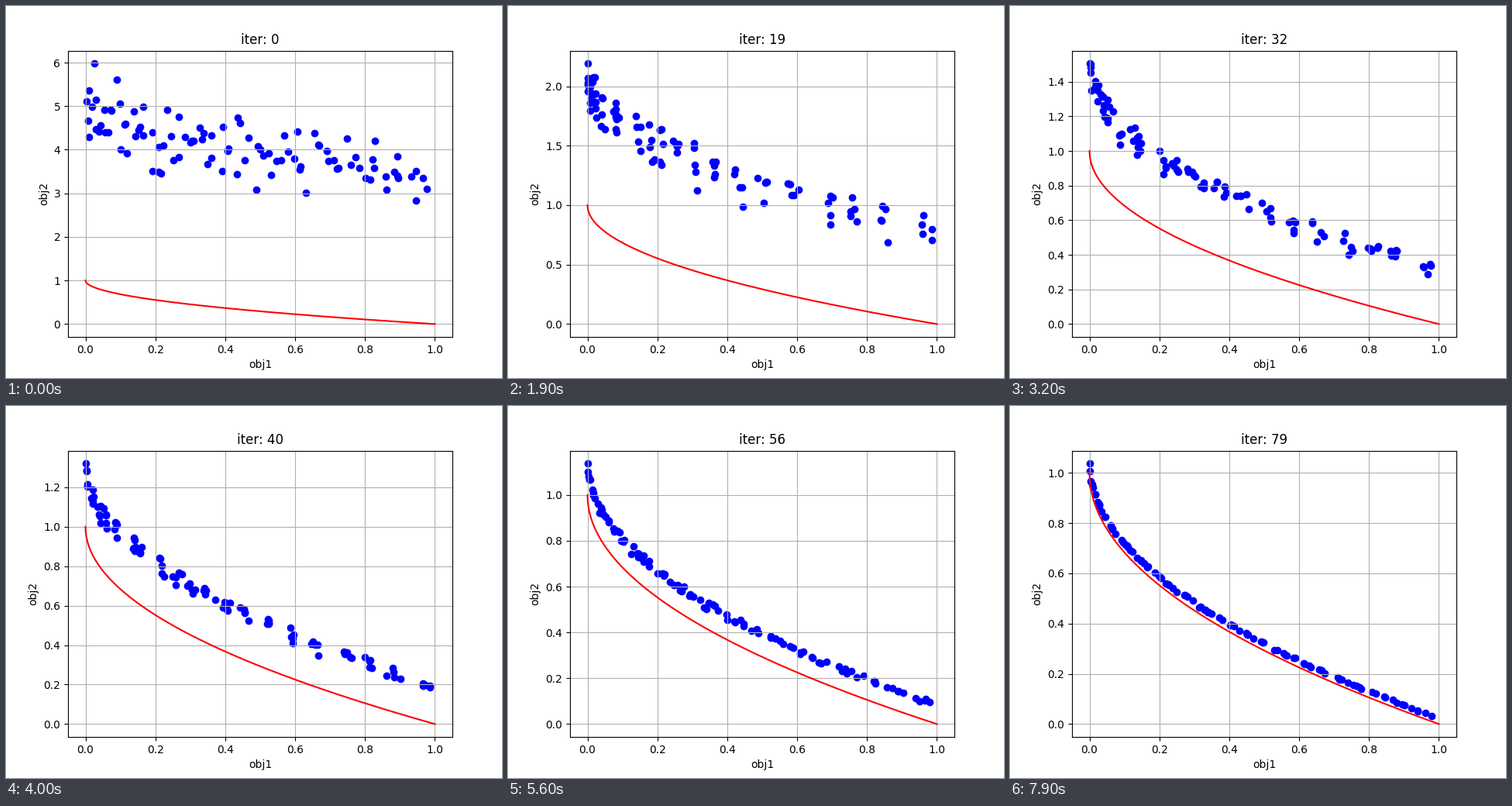
These frames come from a looping animation (640 by 480 pixels, 8 s). A matplotlib script:

```python
import numpy as np
import matplotlib.pyplot as plt
from matplotlib.animation import FuncAnimation

FRAMES, POP, FAMILIES = 80, 100, 20

# Key points of the largest obj2 over the generations
GENS = [0, 8, 19, 32, 47, 67, 79]
TOPS = [5.9755, 4.24, 2.19, 1.505, 1.2147, 1.0785, 1.037]


def top_at(t):
    return 1 + np.exp(np.interp(t, GENS, np.log(np.subtract(TOPS, 1))))


def front(x, g):
    return g - np.sqrt(g * x)


def breed(t, family, rng):
    """Candidates for generation t: spread out, then clumped, then even."""
    clump = np.interp(t, [0, 8, 32, 67], [0, 1, 0.8, 0])
    power = np.interp(t, [0, 8, 32, 79], [1.3, 2.4, 1.6, 1.5])
    even = (np.arange(POP) + rng.random(POP)) / POP
    u = clump * family + (1 - clump) * even + rng.normal(0, 0.006, POP)
    x = 0.985 * np.clip(np.abs(u), 0, 1) ** power

    top = top_at(t)
    noise = np.clip(rng.normal(size=POP), -2, 2)
    g = 1 + (top - 1) * (0.87 + 0.0026 * t + 0.1 * x + 0.1 * noise)
    y = top - np.abs(top - front(x, g))
    return x, y


def evolve():
    rng = np.random.default_rng(7)
    centres = (np.arange(FAMILIES) + rng.random(FAMILIES)) / FAMILIES
    family = np.repeat(centres, POP // FAMILIES)
    x, y = breed(0, family, rng)
    history = []
    for t in range(FRAMES):
        top = top_at(t)
        if t:
            # Members die by chance or when the front has left them behind
            limit = 1 + (top - 1) * (1.07 + 0.0026 * t + 0.1 * x)
            dead = (rng.random(POP) < 0.25) | (y > front(x, limit)) | (y > top)
            new_x, new_y = breed(t, family, rng)
            x, y = np.where(dead, new_x, x), np.where(dead, new_y, y)
        pts = np.column_stack([x, y])
        pts[0] = (0 if t else 0.025), top
        history.append(pts)
    return history


history = evolve()

fig, ax = plt.subplots(figsize=(6.4, 4.8), dpi=100)
dots = ax.scatter(*history[0].T, color="blue")
curve = np.linspace(0, 1, 1000)
ax.plot(curve, front(curve, 1), color="red")
ax.set(xlabel="obj1", ylabel="obj2", xlim=(-0.05, 1.05))
ax.grid(True)
title = ax.set_title("iter: 0")


def update(i):
    dots.set_offsets(history[i])
    top = top_at(i)
    ax.set_ylim(-0.05 * top, 1.05 * top)
    title.set_text(f"iter: {i}")
    return dots, title


anim = FuncAnimation(fig, update, frames=FRAMES, interval=100, repeat=True,
                     repeat_delay=0, blit=False)
plt.show()
```
